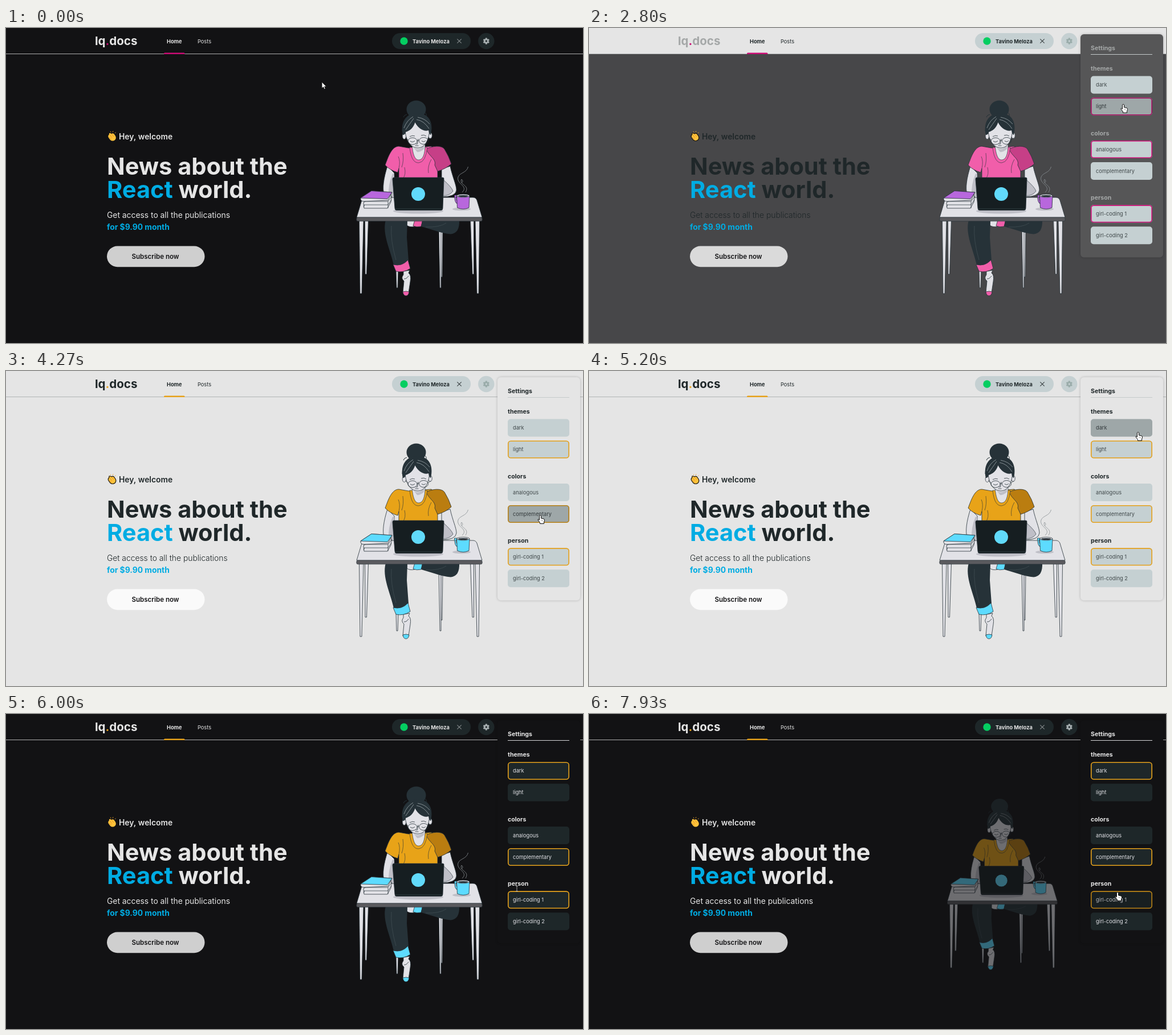
Recreate the animation shown at these times as an HTML page with a canvas. Size 1012 px wide and 554 px high, loop 8 s.

```html
<!DOCTYPE html>
<html lang="en">
<head>
<meta charset="utf-8">
<title>News landing page</title>
<style>
html, body { margin: 0; width: 100%; height: 100%; overflow: hidden; background: #121214; }
canvas { display: block; width: 1012px; height: 554px; }
</style>
</head>
<body>
<canvas id="stage" width="1012" height="554"></canvas>
<script>
const W = 1012, H = 554, LOOP = 8000;
const stage = document.getElementById('stage').getContext('2d');
const layerCanvas = Object.assign(document.createElement('canvas'), { width: W, height: H });
const layer = layerCanvas.getContext('2d');
let g = stage;

const INK = '#263238', PALE = '#e2e2e7', SHADE = '#bfbfc7', BLUE = '#00ace3';
const DARK = { bg: '#121214', text: '#e5e5e5', box: '#1e2729', label: '#e1e1e6', line: '#adadad',
  cross: '#858b8d', gear: '#a5adaf', cta: '#cfcfcf' };
const LIGHT = { bg: '#e5e5e5', text: '#1f2729', box: '#c5d0d2', label: '#41494b', line: '#b1b4b5',
  cross: '#3a4143', gear: '#9aacaa', cta: '#fafafa' };
const ANALOGOUS = { accent: '#cb0b74', shirt: '#f15eaa', sleeve: '#c63f87', item: '#b867dd', cuff: '#f15eaa' };
const COMPLEMENTARY = { accent: '#e6a11a', shirt: '#e8a318', sleeve: '#ba7d10', item: '#5ddbff', cuff: '#5ddbff' };

const TO_LIGHT = 2640, TO_DARK = 5330, RECOLOR = 4070, PERSON_2 = 6470, PERSON_1 = 7670;

const clamp = v => Math.min(1, Math.max(0, v));
const ramp = (t, start, length) => clamp((t - start) / length);
const smooth = k => k * k * (3 - 2 * k);
const lightness = (t, delay, length) =>
  ramp(t, TO_LIGHT + delay, length) - ramp(t, TO_DARK + delay, length);

function mix(a, b, k) {
  const part = (hex, i) => parseInt(hex.slice(i, i + 2), 16);
  return 'rgb(' + [1, 3, 5].map(i => Math.round(part(a, i) + (part(b, i) - part(a, i)) * k)) + ')';
}

function shape(d, fill, stroke, width = 0.8) {
  const p = new Path2D(d);
  if (fill) { g.fillStyle = fill; g.fill(p); }
  if (stroke) { g.strokeStyle = stroke; g.lineWidth = width; g.stroke(p); }
}
function oval(x, y, rx, ry, fill, stroke, width = 0.8) {
  g.beginPath();
  g.ellipse(x, y, rx, ry, 0, 0, Math.PI * 2);
  if (fill) { g.fillStyle = fill; g.fill(); }
  if (stroke) { g.strokeStyle = stroke; g.lineWidth = width; g.stroke(); }
}
function round(x, y, w, h, r, fill, stroke, width = 1.6) {
  g.beginPath();
  g.roundRect(x, y, w, h, r);
  if (fill) { g.fillStyle = fill; g.fill(); }
  if (stroke) { g.strokeStyle = stroke; g.lineWidth = width; g.stroke(); }
}
function rect(x, y, w, h, fill) {
  g.fillStyle = fill;
  g.fillRect(x, y, w, h);
}
function text(s, x, y, size, weight, fill) {
  g.font = `${weight} ${size}px Inter, sans-serif`;
  g.fillStyle = fill;
  g.fillText(s, x, y);
  return x + g.measureText(s).width;
}
function group(alpha, draw) {
  if (alpha <= 0) return;
  layer.clearRect(0, 0, W, H);
  g = layer;
  g.save();
  draw();
  g.restore();
  g = stage;
  g.globalAlpha = alpha;
  g.drawImage(layerCanvas, 0, 0);
  g.globalAlpha = 1;
}

// Pointer: time, x, y of the hot spot
const PATH = [
  [0, 554, 95], [70, 554, 95], [800, 845, 19], [1200, 845, 19], [1760, 832, 94], [2000, 827, 140],
  [2200, 844, 185], [2330, 937, 134], [3350, 937, 133], [3870, 937, 253], [4300, 937, 253],
  [4900, 957, 112], [5150, 963, 107], [5520, 963, 107], [6000, 896, 307], [6300, 916, 357],
  [7270, 916, 357], [7470, 925, 323], [7640, 925, 323], [7930, 927, 313], [LOOP, 927, 313]
];
function pointerAt(t) {
  const i = PATH.findIndex(p => p[0] > t);
  const [t0, x0, y0] = PATH[i - 1], [t1, x1, y1] = PATH[i];
  const k = smooth((t - t0) / (t1 - t0));
  return { x: x0 + (x1 - x0) * k, y: y0 + (y1 - y0) * k };
}

const SECTIONS = [
  { title: 'themes', y: 84.5, items: ['dark', 'light'] },
  { title: 'colors', y: 198, items: ['analogous', 'complementary'] },
  { title: 'person', y: 311.3, items: ['girl-coding 1', 'girl-coding 2'] }
];
const itemTop = (section, i) => section.y + i * 38;
const inside = (p, x, y, w, h) => p.x >= x && p.x <= x + w && p.y >= y && p.y <= y + h;
const overGear = p => Math.hypot(p.x - 842, p.y - 23) < 14;

function drawHeader(theme, tint, logoColor, p) {
  rect(0, 0, W, 45.5, theme.bg);
  rect(0, 45, W, 1, theme.line);
  let x = text('lq', 156, 30, 20.5, 700, logoColor);
  x = text('.', x, 30, 20.5, 700, tint.accent);
  text('docs', x, 30, 20.5, 700, logoColor);
  text('Home', 282, 26.5, 9.23, 700, theme.text);
  text('Posts', 336, 26.5, 9.23, 400, theme.text);
  round(277, 43.5, 36.5, 2.5, [1.5, 1.5, 0, 0], tint.accent);

  round(677, 9, 138, 28, 14, theme.box);
  oval(698, 23, 6.7, 6.7, '#04ce61');
  text('Tavino Meloza', 713, 26.6, 9.23, 700, theme.text);
  shape('M791.3 19.3l7.4 7.4m0-7.4l-7.4 7.4', null, theme.cross, 1.1);

  oval(842.3, 23, 14.2, 14.2, theme.box);
  g.save();
  g.translate(842.3, 23);
  for (let i = 0; i < 6; i++) {
    g.rotate(Math.PI / 3);
    rect(-1.5, -5.6, 3, 4, theme.gear);
  }
  g.restore();
  oval(842.3, 23, 3.1, 3.1, null, theme.gear, 2.4);
  if (overGear(p)) oval(842.3, 23, 14.2, 14.2, 'rgba(0,0,0,.2)');
}

function drawClap(outline) {
  shape('M181 187Q180 184 183 185L185 186Q188 184 190 187L192 190Q194 194 191 197Q187 200 183 197L180 193Q178 190 181 187Z',
    '#ffc23b', outline, 1.2);
  shape('M182 188l4 5m-1-7l4 5m-8 1l4 4', null, '#d98a1b', 0.8);
  shape('M184 183.5l-.8-1.8m4 1.5l.7-2m3 3.6l1.6-1', null, '#f0a52c', 0.9);
}

function drawHero(theme, bodyMix) {
  drawClap(theme === LIGHT ? '#17130c' : null);
  text('Hey, welcome', 198, 195.6, 13.85, 600, theme.text);
  text('News about the', 177, 257.8, 41.5, 700, theme.text);
  const x = text('React', 177, 299.3, 41.5, 700, BLUE);
  text(' world.', x, 299.3, 41.5, 700, theme.text);
  text('Get access to all the publications', 177, 334, 13.85, theme === LIGHT ? 300 : 400, theme.text);
  text('for $9.90 month', 177, 354.5, 13.85, 700, BLUE);
  round(177, 383.5, 171.5, 36.7, 18.4, mix(DARK.cta, LIGHT.cta, bodyMix));
  text('Subscribe now', 220.5, 405.7, 11.54, 600, '#121214');
}

function drawDesk(tint) {
  const leg = d => shape(d, PALE, INK);
  leg('M684 425h4l-1 32h-2Z');
  leg('M762 350h4l-1 88h-2Z');
  leg('M759 350h4l0 107h-2Z');
  leg('M629.5 339h6l-3 94h-2.5Z');
  leg('M814.5 339h6l0 94h-2.5Z');
  leg('M619.5 339h7.5l-3 128h-3Z');
  leg('M823 339h7.5l-1.5 128h-3Z');
  drawLegs(tint);
  shape('M630 298H819Q824 298 826 303L835 333H615L624 303Q626 298 630 298Z', PALE, INK);
  round(614.8, 333, 220.4, 6.8, 2.5, '#5a5a5e', INK, 0.6);
}

function drawLegs(tint) {
  shape('M703 338H717V349Q708 351 703 347Z', PALE, INK);
  shape('M717 338H731L728 349Q720 351 714 348Z', tint.cuff, INK);
  shape('M730 338H795Q796 361 780 362.5C763 361 746 354 728 349Z', INK);
  shape('M697 428L708 426L706 431Q711 434 709 446L706 466Q701 469 696 466L698 445Q692 440 697 434Z', PALE, INK);
  shape('M696 464Q702 462 707 464Q706 471 701.5 471Q697 471 696 464Z', tint.cuff, INK);
  shape('M698 441q4 1 8-5', null, INK);
  shape('M666 338H704L703 368L706 409Q694 420 680 417C675 392 659 362 666 338Z', INK);
  shape('M679 416Q694 420 705 408L709 423Q697 431 684 428Z', tint.cuff, INK);
  shape('M676 348q-2 25 8 60m88-65q-12 8-36 7', null, '#48565c', 0.6);
}

function drawBody(tint) {
  shape('M669 243C662 265 660 282 663 292Q667 298 681 298V255Z', PALE, INK);
  shape('M678 256Q670 275 671 296L681 298V258Z', SHADE);
  shape('M764 248L779 243C783 262 790 276 790 285Q789 297 764 297Z', PALE, INK);
  shape('M766 266Q782 280 784 287Q777 296 765 295Z', SHADE, INK, 0.6);
  shape('M706 211L689 208C676 208 670 228 665 241Q673 250 687 254L689 247V266H757V250L766 225L746 208Z', tint.shirt, INK);
  shape('M737 213C748 207 764 206 769 213Q777 226 781 239Q771 248 757 252L752 241C755 230 742 226 737 213Z', tint.sleeve, INK);
  shape('M689 247q3-13-1-21m8-6q2 14-2 25m52-14q-7 12-5 24m-42-10q3 13-3 20', null, INK, 0.6);
  shape('M708 210Q711 238 724 237Q736 236 739 210Z', tint.shirt, INK, 0.6);
  shape('M712 204H735Q735 232 723.5 232Q714 232 712 204Z', PALE, INK, 0.6);
  shape('M714 209Q722 219 733 206L733 213Q726 219 721 218Z', SHADE);
}

function drawHead() {
  shape('M703 152q-5 1-6 5m37-8q4 1 3 6m-42 26q0-8 3-16', null, INK, 1);
  oval(719.5, 143, 17, 15.5, INK);
  oval(698.5, 190, 3.3, 5.5, PALE, INK, 0.7);
  oval(744, 189, 3.3, 5.5, PALE, INK, 0.7);
  shape('M700 173C699 199 711 211 722 211C734 211 743 198 743 173L720 160Z', PALE, INK);
  shape('M696 188C691 165 702 149 722 150C743 150 750 168 745 188Q742 187 741 180C733 183 722 176 717.5 166C714 177 707 181 701 183Q700 188 696 188Z', INK);
  shape('M698 176q5-14 16-20m-13 23q6-9 14-20m5 2q13 2 22 16m-20-20q13 2 21 12', null, '#c3cbcf', 0.6);
  oval(713, 199, 8, 6, null, INK, 0.8);
  oval(732.5, 198.5, 8, 6, null, INK, 0.8);
  shape('M721 198q1.5-1 3.5 0m-19-1l-5-4m40 4l4-4', null, INK, 0.8);
  shape('M709 199q4 3 8-.5m12 0q4 3 7-.5m-28-7q5-3 9-1m11-1q5-2 9 1m-14 5l-1.500 9h-3m-1 3h6', null, INK, 0.8);
}

function drawObjects(tint) {
  oval(723, 322, 44, 4.5, SHADE);
  shape('M680 263H766Q768.500 263 768 266L766 317Q766 320.500 763 320.500H685Q682 320.500 682 317L678 266Q678 263 680 263Z', '#161e21', INK);
  shape('M682 318H765', null, '#39464b', 0.7);
  oval(723, 292, 12, 12, '#61dafb');

  shape('M627 307L650 292H675Q677 300 675 306L669 317H628Z', PALE, INK);
  shape('M628 311H670L676 302M627 315l2-4M627 305H670L677 296M670 305V317', null, INK, 0.7);
  shape('M622 299L641 286.500L677 289L670 303L627 305Q621 304 622 299Z', PALE, INK);
  shape('M622 299L641 286.500L677 289L669 300.500Z', tint.item, INK);

  oval(799, 318.500, 16, 2.8, SHADE);
  shape('M792 294H786.500Q787 309 792 309V305Q789 303 789 297H792Z', tint.item, INK);
  shape('M790.500 295H813L812 316Q802 321 791.500 316Z', tint.item, INK);
  oval(801.8, 295, 11.2, 2.8, PALE, INK);
  oval(801.8, 295.5, 8.8, 1.6, INK);
  shape('M800 289C812 278 789 274 793 262C796 254 808 255 810.500 244M806 289C814 276 794 276 799 266Q803 270 799 272', null, '#8b9195', 0.8);
}

function drawPerson(tint, k) {
  const s = 0.78 + 0.22 * k;
  group(k, () => {
    g.translate(725, 300);
    g.scale(s, s);
    g.translate(-725, -300);
    drawDesk(tint);
    drawBody(tint);
    drawHead();
    drawObjects(tint);
  });
}

function drawPanel(theme, tint, fade, chosen, p) {
  const title = mix(DARK.text, LIGHT.text, fade);
  g.shadowColor = 'rgba(0,0,0,.22)';
  g.shadowBlur = 4;
  round(862, 11, 145, 392.500, 6, mix(DARK.bg, LIGHT.bg, fade));
  g.shadowColor = 'transparent';
  text('Settings', 880, 39.4, 10.6, 700, title);
  rect(880, 46, 108, 1, theme === LIGHT ? '#c5cacb' : '#d6d6d8');
  SECTIONS.forEach((section, n) => {
    text(section.title, 880, section.y - 9.3, 10.6, 700, title);
    section.items.forEach((label, i) => {
      const y = itemTop(section, i);
      round(880, y, 108, 31, 5, theme.box);
      if (chosen[n] === i) round(880.8, y + 0.8, 106.4, 29.4, 4.5, null, tint.accent);
      text(label, 889, y + 18.9, 9.23, 400, theme.label);
      if (inside(p, 880, y, 108, 31)) round(880, y, 108, 31, 5, 'rgba(0,0,0,.2)');
    });
  });
}

function drawPointer(p, panelOpen) {
  const overItem = panelOpen && SECTIONS.some(s =>
    s.items.some((_, i) => inside(p, 880, itemTop(s, i), 108, 31)));
  const overTitle = panelOpen && SECTIONS.some(s => inside(p, 880, s.y - 20, 37, 18));
  g.save();
  g.translate(p.x, p.y);
  g.lineJoin = 'round';
  if (overItem || overGear(p)) {
    shape('M-1.500 1.500Q0-.5 1.500 1.500V6L6 7Q8 7.500 7.500 10L6.500 13V15.500H-.5V13.500L-4 9Q-4.500 6.500-1.500 9Z', '#fff', '#111', 1);
    shape('M2 8.500v2m2-1.500v2', null, '#555', 0.6);
  } else if (overTitle) {
    shape('M-2-4.500H2M0-4.500V4.500M-2 4.500H2', null, '#b5b5b5', 0.9);
  } else {
    shape('M0 0V11L2.600 8.700L4.300 12.500L6.200 11.600L4.500 8H7.800Z', '#fff', '#111', 0.8);
  }
  g.restore();
}

function draw(t) {
  const isLight = t >= TO_LIGHT + 25 && t < TO_DARK;
  const theme = isLight ? LIGHT : DARK;
  const tint = t < RECOLOR ? ANALOGOUS : COMPLEMENTARY;
  const fade = lightness(t, 0, 500), bodyMix = lightness(t, 80, 320);
  const panelAlpha = smooth(ramp(t, 1050, 750));
  const second = t >= PERSON_2 && t < PERSON_1;
  const zoom = t < PERSON_2 ? 1 : ramp(t, second ? PERSON_2 : PERSON_1, 600);
  const chosen = [+isLight, +(tint === COMPLEMENTARY), +second];
  const p = pointerAt(t);

  rect(0, 0, W, H, mix(DARK.bg, LIGHT.bg, bodyMix));
  drawHeader(theme, tint, mix(DARK.text, LIGHT.text, fade), p);
  drawHero(theme, bodyMix);
  drawPerson(tint, zoom);
  group(panelAlpha, () => drawPanel(theme, tint, fade, chosen, p));
  drawPointer(p, panelAlpha > 0);
}

function tick() {
  draw(performance.now() % LOOP);
  requestAnimationFrame(tick);
}
tick();
</script>
</body>
</html>
```
